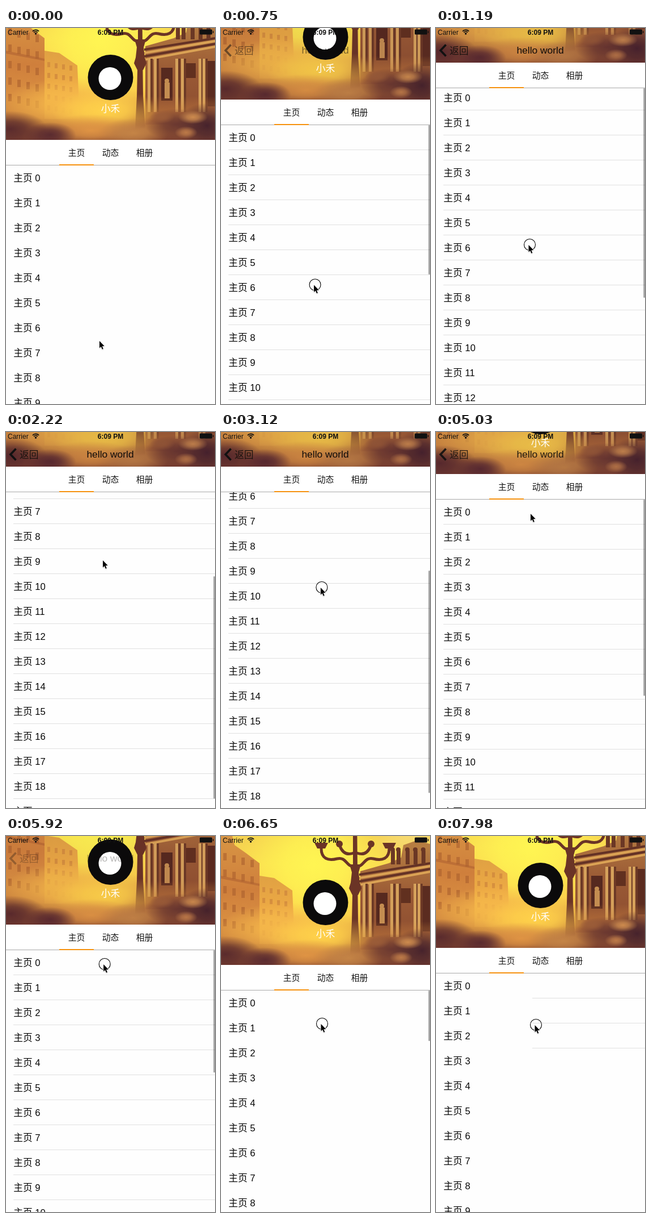
Recreate the animation shown at these times as an HTML page with a canvas. Size 369 by 662 pixels, loop 8 s.

```html
<!DOCTYPE html>
<html lang="zh">
<head>
<meta charset="utf-8">
<title>Profile scroll</title>
<style>
html, body { margin: 0; width: 100%; height: 100%; overflow: hidden; background: #fff; }
canvas { display: block; width: 369px; height: 662px; }
</style>
</head>
<body>
<canvas id="stage" width="369" height="662"></canvas>
<script>
const W = 369, VH = 662, LOOP = 8000, STEP = 147.75;
const ROW = 44, TAB = 44, TOP = 197, MIN = 61, ROWS = 20;
const SANS = '"Liberation Sans", "Noto Sans CJK SC", "Noto Sans CJK", sans-serif';
const ctx = document.getElementById('stage').getContext('2d');

// Tracks: [step, value, ease-out power (default linear)]
const scrollTrack = [[2, 0], [8, 141], [11, 285], [19, 459, 2.69], [20, 459], [24, 283],
  [34, 123, 2.73], [36, 123], [42, 0], [45, -30], [46, -32], [52, 0, 2.6]];
const xTrack = [[0, 165], [8, 163.5], [15, 171], [26, 180], [34, 167], [45, 176.5], [52, 174.5]];
const yTrack = [[0, 551], [1, 541], [2, 523], [8, 382], [11, 238], [15, 226], [20, 230],
  [24, 406], [26, 406], [33, 146], [34, 144], [36, 144], [42, 267], [45, 331], [46, 333]];
const presses = [[2, 11], [20, 24], [35, 46], [54, 54]];

function at(track, k) {
  let prev = track[0];
  for (const key of track) {
    if (k <= key[0]) {
      if (key === prev) return key[1];
      const p = (k - prev[0]) / (key[0] - prev[0]);
      return prev[1] + (key[1] - prev[1]) * (1 - (1 - p) ** (key[2] || 1));
    }
    prev = key;
  }
  return prev[1];
}

const clamp = (v, a, b) => Math.min(b, Math.max(a, v));

function rect(c, x, y, w, h, color) {
  c.fillStyle = color;
  c.fillRect(x, y, w, h);
}

function disc(c, x, y, r, color) {
  c.fillStyle = color;
  c.beginPath();
  c.arc(x, y, r, 0, 7);
  c.fill();
}

function poly(c, color, ...pts) {
  c.fillStyle = color;
  c.beginPath();
  for (let i = 0; i < pts.length; i += 2) c.lineTo(pts[i], pts[i + 1]);
  c.closePath();
  c.fill();
}

function text(str, x, y, size, color, align = 'left', weight = '') {
  ctx.font = `${weight} ${size}px ${SANS}`;
  ctx.textAlign = align;
  ctx.fillStyle = color;
  ctx.fillText(str, x, y);
}

// Street at sunset, drawn once; PAD is the extra sky above the visible area
const PAD = 40;
function paintPhoto() {
  const cv = document.createElement('canvas');
  cv.width = W;
  cv.height = 227 + PAD;
  const c = cv.getContext('2d');
  c.translate(0, PAD);

  const fade = (y0, y1, ...stops) => {
    const g = c.createLinearGradient(0, y0, 0, y1);
    stops.forEach((s, i) => g.addColorStop(i / (stops.length - 1), s));
    return g;
  };
  const glow = (x, y, rx, ry, color) => {
    c.save();
    c.translate(x, y);
    c.scale(rx, ry);
    const g = c.createRadialGradient(0, 0, 0, 0, 0, 1);
    g.addColorStop(0, color);
    g.addColorStop(0.4, color + 'c0');
    g.addColorStop(1, color + '00');
    disc(c, 0, 0, 1, g);
    c.restore();
  };

  rect(c, 0, -PAD, W, 227 + PAD, fade(-PAD, 227, '#f0c850', '#fadc50', '#fbcb4b', '#b06a35'));
  glow(165, 50, 130, 120, '#fff552');
  glow(335, 0, 70, 45, '#f7da72');

  // left houses
  poly(c, fade(0, 190, '#d89544', '#cf7f3c', '#e09a45'),
    0, -PAD, 10, -PAD, 24, 16, 44, 30, 68, 48, 68, 190, 0, 190);
  poly(c, fade(70, 180, '#e0a143', '#eca944', '#f5bd4c'), 68, 70, 94, 74, 126, 96, 130, 190, 68, 190);
  poly(c, '#bd6f36', 0, 70, 68, 84, 68, 88, 0, 75);
  for (let r = 0; r < 5; r++) {
    for (let i = 0; i < 4; i++) {
      rect(c, 4 + i * 16, 30 + r * 29 + i * 4, 6, 13, '#ad622fa0');
      rect(c, 73 + i * 13, 90 + r * 19 + i * 2, 5, 9, '#cb823ba0');
    }
  }

  // palace on the right
  poly(c, fade(20, 190, '#b67d42', '#9a5a35', '#8b4c30'),
    246, 62, 296, 48, 318, 38, 322, 16, 345, 8, W, 14, W, 200, 246, 200);
  for (let i = 0; i < 4; i++) {
    poly(c, i % 2 ? '#dba355' : '#633125',
      244, 66 + i * 6, W, 46 + i * 5, W, 50 + i * 5, 244, 70 + i * 6);
  }
  rect(c, 274, 100, 20, 58, '#56291f');
  rect(c, 280, 126, 9, 28, '#c48d51');
  disc(c, 284, 123, 4, '#c48d51');
  rect(c, 318, 92, 17, 26, '#61301f');
  rect(c, 353, 88, 16, 80, '#5b2c20');
  for (const x of [250, 261, 299, 309, 340, 347]) {
    rect(c, x, 84, 5, 94, '#d5a15b');
    rect(c, x + 5, 84, 4, 94, '#6d3a26');
  }
  for (const x of [303, 313, 329, 343, 357]) {
    rect(c, x - 3, 26, 7, 24, '#6b3825');
    disc(c, x, 24, 4, '#6b3825');
  }

  // street and blurred foreground
  rect(c, 0, 150, W, 77, fade(150, 227, '#d58b4000', '#c37a3cb0', '#7b4030'));
  glow(120, 165, 125, 48, '#f6b84a');
  glow(175, 176, 95, 38, '#ffd24a');
  glow(150, 210, 85, 28, '#df9444');
  glow(225, 215, 62, 26, '#c48446');
  glow(8, 208, 65, 32, '#5a2b2d');
  glow(78, 218, 46, 22, '#5a2b30');
  glow(300, 200, 55, 28, '#6b3830');
  glow(355, 202, 55, 40, '#46222c');
  glow(330, 187, 26, 12, '#cd8b4e');
  glow(318, 214, 20, 11, '#bd7a48');
  glow(276, 186, 22, 12, '#9a5c38');

  // street lamp
  const iron = '#6b3426';
  poly(c, fade(-PAD, 208, iron, iron, iron, iron, iron + '00'),
    233, -PAD, 240, -PAD, 241, 60, 242, 150, 246, 208, 228, 208, 231, 150, 233, 60);
  poly(c, iron, 227, 50, 247, 50, 243, 64, 245, 82, 248, 92, 242, 104, 232, 104, 226, 92, 229, 82, 231, 64);
  c.strokeStyle = iron;
  c.lineWidth = 5;
  c.lineCap = 'round';
  for (const side of [-1, 1]) {
    const x = d => 237 + side * d;
    c.beginPath();
    c.moveTo(x(2), 54);
    c.bezierCurveTo(x(16), 54, x(16), 36, x(32), 40);
    c.bezierCurveTo(x(48), 44, x(60), 40, x(60), 22);
    c.stroke();
    c.beginPath();
    c.moveTo(x(3), 30);
    c.quadraticCurveTo(x(20), 36, x(27), 18);
    c.stroke();
    poly(c, iron, x(48), 12, x(72), 12, x(67), 22, x(53), 22);
    disc(c, x(28), 14, 6, iron);
  }
  return cv;
}
const photo = paintPhoto();

function statusBar() {
  text('Carrier', 3, 12, 12, '#111');
  text('6:09 PM', 184.5, 12, 12, '#111', 'center', 'bold');
  ctx.strokeStyle = '#111';
  ctx.lineWidth = 1.7;
  for (const r of [4.6, 7.6]) {
    ctx.beginPath();
    ctx.arc(52.5, 11, r, -Math.PI * 0.76, -Math.PI * 0.24);
    ctx.stroke();
  }
  disc(ctx, 52.5, 10, 1.7, '#111');
  ctx.beginPath();
  ctx.roundRect(342, 2.5, 22, 9, 1.5);
  ctx.fill();
  rect(ctx, 365, 5.2, 1.4, 3.8, '#111');
}

function header(h, s) {
  const nav = clamp(s / 136, 0, 1);
  ctx.save();
  ctx.beginPath();
  ctx.rect(0, 0, W, h);
  ctx.clip();
  ctx.drawImage(photo, 0, h - 227 - PAD);
  rect(ctx, 0, 0, W, h, `rgba(60,20,45,${0.12 * nav})`);
  if (h > MIN) {
    disc(ctx, 184.5, h - 110, 40, '#0b0a0b');
    disc(ctx, 183.5, h - 108, 20, '#fff');
    text('小禾', 184.5, h - 49, 16.7, '#fff', 'center');
  }
  ctx.globalAlpha = nav;
  ctx.strokeStyle = '#111';
  ctx.lineWidth = 3.6;
  ctx.lineCap = 'butt';
  ctx.beginPath();
  ctx.moveTo(17.5, 29.5);
  ctx.lineTo(8, 39.5);
  ctx.lineTo(17.5, 49.5);
  ctx.stroke();
  text('返回', 24, 46, 16.7, '#1c1410');
  text('hello world', 184, 45, 17.4, '#100c0a', 'center');
  ctx.restore();
}

function list(s, k) {
  const y0 = TOP + TAB - s;
  for (let i = 0; i < ROWS; i++) {
    const y = Math.round(y0 + i * ROW);
    text('主页 ' + i, 13.3, y + 29, 16.7, '#080808');
    if (s > 20) rect(ctx, 13, y + 44, W - 13, 1, '#e0e0e0');
    else if (k >= 48 && i < 3) rect(ctx, 170, y + 44, W - 170, 1, '#e0e0e0');
  }
}

function tabs(h) {
  rect(ctx, 0, h, W, TAB, '#fff');
  rect(ctx, 0, h + TAB, W, 1, '#a9a9a9');
  rect(ctx, 94, h + 43, 61, 2, '#f6920f');
  ['主页', '动态', '相册'].forEach((t, i) =>
    text(t, 124.5 + i * 60, h + 28, 14.8, '#151515', 'center'));
}

function scrollbar(s, h) {
  const end = 392.4 + 0.586 * s + Math.min(0, s) * 0.46;
  const start = Math.max(h + TAB + 1, end - 391.5);
  ctx.fillStyle = 'rgba(0,0,0,.36)';
  ctx.beginPath();
  ctx.roundRect(366.3, start, 2.7, end - start, 1.3);
  ctx.fill();
}

function pointer(x, y, down) {
  ctx.save();
  ctx.translate(x, y);
  if (down) {
    ctx.strokeStyle = '#000';
    ctx.lineWidth = 1.1;
    ctx.beginPath();
    ctx.arc(2, -0.5, 10, 0, 7);
    ctx.stroke();
  }
  const arrow = [0, 0, 0, 12.4, 2.8, 9.9, 4.9, 14.8, 6.8, 14, 4.8, 9.2, 8.7, 9];
  ctx.shadowColor = 'rgba(0,0,0,.4)';
  ctx.shadowBlur = 2;
  ctx.shadowOffsetY = 1;
  poly(ctx, '#000', ...arrow);
  ctx.shadowColor = 'transparent';
  ctx.strokeStyle = '#fff';
  ctx.lineWidth = 1.6;
  ctx.lineJoin = 'round';
  ctx.stroke();
  poly(ctx, '#000', ...arrow);
  ctx.restore();
}

function draw(t) {
  const k = Math.floor((t + 4) / STEP);
  const s = Math.round(at(scrollTrack, k));
  const h = Math.max(MIN, TOP - s);
  rect(ctx, 0, 0, W, VH, '#fefefe');
  list(s, k);
  tabs(h);
  header(h, s);
  statusBar();
  if (k > 1 && k < 52) scrollbar(s, h);
  pointer(at(xTrack, k), at(yTrack, k), presses.some(([a, b]) => k >= a && k <= b));
}

const begin = performance.now();
function loop() {
  draw((performance.now() - begin) % LOOP);
  requestAnimationFrame(loop);
}
loop();
</script>
</body>
</html>
```
